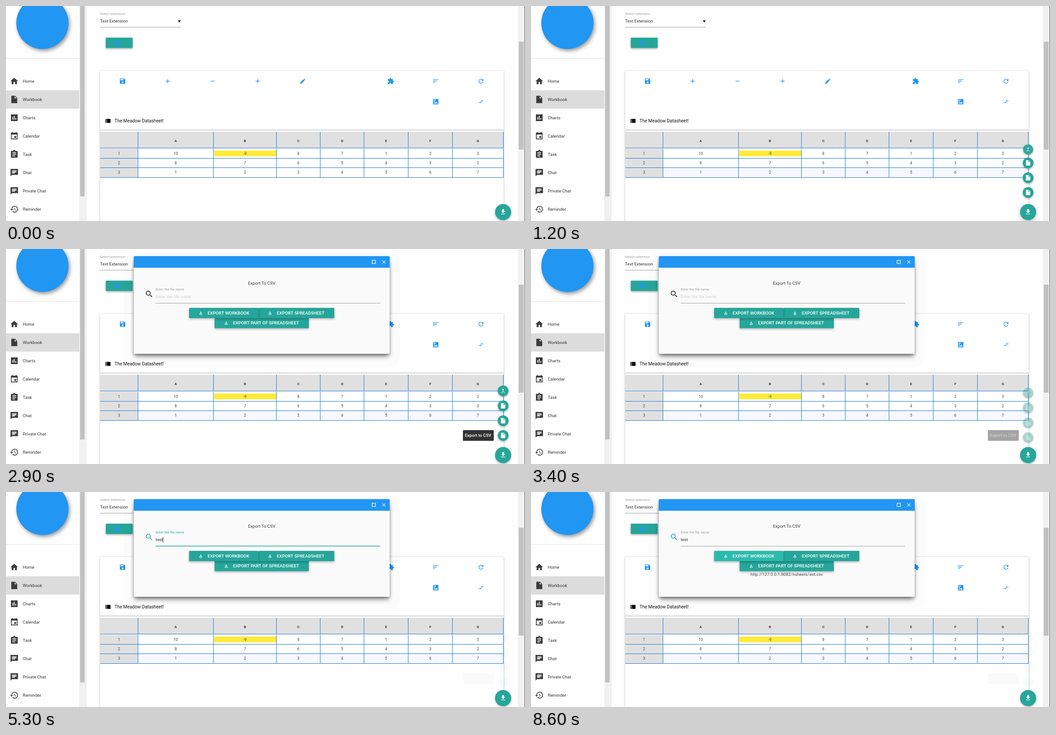
An HTML page with a canvas that plays this animation: 1162x482 px, repeating every 9900 ms.

```html
<!DOCTYPE html>
<html lang="en">
<head>
<meta charset="utf-8">
<title>Worksheet export</title>
<style>
  html, body { margin: 0; width: 100%; height: 100%; overflow: hidden; background: #fff; }
  canvas { display: block; }
</style>
</head>
<body>
<canvas id="stage" width="1162" height="482"></canvas>
<script>
const ctx = document.getElementById('stage').getContext('2d');
const LOOP = 9900, STEP = 100;
const TEAL = '#26a69a', BLUE = '#2196f3', LINE = '#1976d2';

// Icon outlines on a 24 unit square, filled even-odd
const ICONS = {
  home: 'M10 20v-6h4v6h5v-8h3L12 3 2 12h3v8z',
  file: 'M4 2H14l6 6V22H4zM13 3.5V9h5.5z',
  chart: 'M3 3H21V21H3zM7 10h2v7H7zM11 7h2v10h-2zM15 13h2v4h-2z',
  event: 'M3 3h3V1h2v2h8V1h2v2h3v18H3zM5 8v11h14V8zM12 12h5v5h-5z',
  task: 'M3 3h6a3 3 0 0 1 6 0h6v18H3zM11 4a1 1 0 1 0 2 0 1 1 0 1 0-2 0zM7 7h10v2H7zM7 11h10v2H7zM7 15h7v2H7z',
  chat: 'M2 2H22V18H6l-4 4zM6 6h12v2H6zM6 9h12v2H6zM6 12h8v2H6z',
  history: 'M4 12a9 9 0 1 1 2.64 6.36l1.42-1.42A7 7 0 1 0 6 12h3l-4 4-4-4zM12 8h1.5v4.25l3.5 2.08-.72 1.21L12 13z',
  save: 'M3 3H17l4 4V21H3zM5 5v4h10V5zM9 16a3 3 0 1 0 6 0 3 3 0 1 0-6 0z',
  add: 'M19 13h-6v6h-2v-6H5v-2h6V5h2v6h6z',
  remove: 'M5 11h14v2H5z',
  edit: 'M3 17.25V21h3.75L17.8 9.9l-3.75-3.75zM20.7 7 17 3.3l-1.9 1.8 3.75 3.75z',
  puzzle: 'M2 5h6V3.5a2.5 2.5 0 0 1 5 0V5h6v6h1.5a2.5 2.5 0 0 1 0 5H19v6h-5.8v-1.5a2.7 2.7 0 0 0-5.4 0V22H2v-5.8h1.5a2.7 2.7 0 0 0 0-5.4H2z',
  sort: 'M3 16h6v2H3zM3 6h18v2H3zM3 11h12v2H3z',
  refresh: 'M17.65 6.35A8 8 0 1 0 19.73 14h-2.08a6 6 0 1 1-1.43-6.22L13 11h7V4z',
  picture: 'M3 3H21V21H3zM5 5v3a3 3 0 0 0 3-3zM5 10v2a7 7 0 0 0 7-7h-2a5 5 0 0 1-5 5zM5 18h14l-4.5-6-3.5 4.5-2.5-3z',
  compare: 'M2 14h7v-3l4 4-4 4v-3H2zM22 8h-7V5l-4 4 4 4v-3h7z',
  download: 'M19 9h-4V3H9v6H5l7 7zM5 18h14v2H5z',
  merge: 'M17 20.4 18.4 19 15 15.6 13.6 17zM7.5 8H11v5.6L5.6 19 7 20.4l6-6V8h3.5L12 3.5z',
  search: 'M3 9.5a6.5 6.5 0 1 1 11.4 4.2l.3.3h.8l5 5-1.5 1.5-5-5v-.8l-.3-.3A6.5 6.5 0 0 1 3 9.5zM5 9.5a4.5 4.5 0 1 0 9 0 4.5 4.5 0 1 0-9 0z',
  close: 'M19 6.4 17.6 5 12 10.6 6.4 5 5 6.4 10.6 12 5 17.6 6.4 19 12 13.4 17.6 19 19 17.6 13.4 12z',
  square: 'M4 4H20V20H4zM6.5 6.5v11h11v-11z',
  work: 'M11 5h2v5.6h3.5L12 15.1l-4.5-4.5H11zM6 14h2a4 4 0 0 0 8 0h2a6 6 0 0 1-12 0z'
};
for (const name in ICONS) ICONS[name] = new Path2D(ICONS[name]);

const clamp = v => Math.max(0, Math.min(1, v));
const span = (t, from, to) => clamp((t - from) / (to - from));
const ease = p => p < .5 ? 2 * p * p : 1 - 2 * (1 - p) ** 2;
const mix = (a, b, p) => `rgb(${a.map((v, i) => Math.round(v + (b[i] - v) * p))})`;
const teal = [38, 166, 154], grey = [158, 158, 158], dark = [33, 33, 33];

function rect(x, y, w, h, color) {
  ctx.fillStyle = color;
  ctx.fillRect(x, y, w, h);
}

function icon(name, x, y, size, color) {
  ctx.save();
  ctx.translate(x - size / 2, y - size / 2);
  ctx.scale(size / 24, size / 24);
  ctx.fillStyle = color;
  ctx.fill(ICONS[name], 'evenodd');
  ctx.restore();
}

// y is the middle of the capitals
function text(str, x, y, size, color, align = 'left', weight = 400) {
  ctx.font = `${weight} ${size}px Roboto, sans-serif`;
  ctx.textAlign = align;
  ctx.fillStyle = color;
  ctx.fillText(str, x, y + size * .355);
}

function shadow(alpha, blur, dy, dx = 0) {
  ctx.shadowColor = `rgba(0,0,0,${alpha})`;
  ctx.shadowBlur = blur;
  ctx.shadowOffsetX = dx;
  ctx.shadowOffsetY = dy;
}

function panel(x, y, w, h, r, color, ...cast) {
  ctx.save();
  if (cast.length) shadow(...cast);
  ctx.fillStyle = color;
  ctx.beginPath();
  ctx.roundRect(x, y, w, h, r);
  ctx.fill();
  ctx.restore();
}

function disc(x, y, r, color, ...cast) {
  ctx.save();
  if (cast.length) shadow(...cast);
  ctx.fillStyle = color;
  ctx.beginPath();
  ctx.arc(x, y, r, 0, 7);
  ctx.fill();
  ctx.restore();
}

function sidebar() {
  disc(81.5, 38, 58.5, BLUE, .4, 9, 4, 3);
  rect(0, 117, 164, 1, '#e6e6e6');
  rect(0, 189, 164, 41, '#dcdcdc');
  const items = [['home', 'Home'], ['file', 'Workbook'], ['chart', 'Charts'], ['event', 'Calendar'],
    ['task', 'Task'], ['chat', 'Chat'], ['chat', 'Private Chat'], ['history', 'Reminder']];
  items.forEach(([name, label], i) => {
    const y = 168.5 + 41 * i;
    icon(name, 18.5, y, 20, '#3c3c3c');
    text(label, 37.5, y + .5, 9.65, '#333');
  });
  rect(164, 0, 14, 482, '#f1f1f1');
  rect(166, 0, 10, 427, '#c1c1c1');
  rect(178, 0, 2, 482, '#ebebef');
}

function pageTop() {
  text('Select extension', 210.5, 17, 7.75, '#9e9e9e');
  text('Text Extension', 210.5, 34, 9.65, '#333');
  rect(210, 47, 181, 1, '#9e9e9e');
  ctx.fillStyle = '#000';
  ctx.fill(new Path2D('M385 32h6l-3 5.5z'));
  panel(223.5, 71, 60, 23, 1.5, TEAL, .35, 4, 2);
  icon('save', 249, 82.5, 14, BLUE);
}

function table(hover) {
  const cols = [211, 296, 465, 606, 704, 802, 901, 1000, 1114];
  const rows = [[10, -9, 8, 7, 1, 2, 3], [8, 7, 6, 5, 4, 3, 2], [1, 2, 3, 4, 5, 6, 7]];
  const mid = i => (cols[i] + cols[i + 1]) / 2 - .5;
  rect(211, 282, 903, 36, '#e0e0e0');
  rect(211, 320, 84, 64, '#e0e0e0');
  ctx.globalAlpha = hover;
  rect(296, 363, 817, 21, '#f6f8fe');
  ctx.globalAlpha = 1;
  rect(466, 324, 139, 13, '#ffeb3b');
  for (const y of [318, 341, 362, 384]) rect(211, y, 903, 1, LINE);
  for (const x of cols.slice(1)) {
    rect(x - 1, 282, 1, 37, LINE);
    rect(x - 1, 320, 1, 64, LINE);
  }
  [...'ABCDEFG'].forEach((c, i) => text(c, mid(i + 1), 302.5, 8, '#333', 'center', 700));
  rows.forEach((row, r) => {
    const y = 330.5 + 21.4 * r;
    text(r + 1, mid(0), y, 8.8, '#444', 'center');
    row.forEach((v, i) => text(v, mid(i + 1), y, 8.8, '#444', 'center'));
  });
}

function sheet(hover) {
  panel(211, 145.5, 903, 360, 1.5, '#fff', .3, 4, 1);
  const tools = [['save', 261], ['add', 362], ['remove', 462.5], ['add', 563.5], ['edit', 664.5],
    ['puzzle', 861.5], ['sort', 962], ['refresh', 1063.5]];
  for (const [name, x] of tools) icon(name, x, 168.5, 16, BLUE);
  icon('picture', 962, 214.5, 16, BLUE);
  icon('compare', 1063.5, 214.5, 14, BLUE);
  rect(223, 253, 2, 9, '#000');
  rect(226, 253, 8, 9, '#000');
  text('The Meadow Datasheet!', 243, 257.5, 10.2, '#111');
  rect(211, 277, 903, 2, '#d2d0d0');
  table(hover);
}

function menu(t) {
  const out = span(t, 2950, 3600);
  for (let i = 0; i < 4; i++) {
    const start = 960 + 30 * i;
    const p = ease(span(t, start, start + 190));
    if (!p) continue;
    const y = [418, 385, 351.5, 318][i] + 40 * (1 - p) + 7 * out;
    const s = .4 + .6 * p;
    ctx.globalAlpha = p * (1 - .975 * out);
    disc(1113, y, 12 * s, TEAL, .3, 4, 2);
    icon(i < 3 ? 'file' : 'merge', 1113, y, 14.5 * s, '#fff');
  }
  const tip = span(t, 2150, 2300) * (1 - .975 * span(t, 3000, 3700));
  if (tip) {
    ctx.globalAlpha = tip;
    panel(1023, 406, 69, 24, 1.5, '#323232');
    text('Export to CSV', 1057, 418, 9.5, '#fff', 'center', 500);
  }
  ctx.globalAlpha = 1;
  const lift = span(t, 850, 1000) * (1 - span(t, 1650, 1800));
  disc(1113, 462, 18, TEAL, .3, 5 + 4 * lift, 2 + lift);
  icon('download', 1113, 461.5, 16, '#fff');
}

function button(x, y, w, label, color, ripple) {
  panel(x, y, w, 23, 1.5, color, .3, 5, 2);
  if (ripple) ripple();
  icon('work', x + 26, y + 11.5, 13, '#fff');
  text(label, x + 41.3, y + 11.2, 9.9, '#fff', 'left', 500);
}

function field(t) {
  const on = span(t, 4050, 4350), off = span(t, 6850, 7100);
  const focus = on * (1 - off);
  const tint = mix(grey, teal, focus);
  icon('search', 320.5, 101, 20, mix(dark, teal, on));
  text('Enter the file name', 335, 90.5, 7.7, tint);
  rect(335, 121, 503, 1, tint);
  if (t < 6900) {
    ctx.globalAlpha = on;
    rect(335, 120.5, 503, 1.5, TEAL);
    ctx.globalAlpha = 1;
  }

  const count = [4900, 5000, 5200, 5300].filter(at => t >= at).length;
  const typed = 'test'.slice(0, count);
  if (count) text(typed, 335, 107, 9.65, '#333');
  else text('Enter the file name', 335, 107, 9.6, '#d0d0d0');
  const blink = [[4100, 4600], [4900, 5800], [6300, 6700]];
  if (blink.some(([a, b]) => t >= a && t < b)) {
    ctx.font = '400 9.65px Roboto, sans-serif';
    rect(335 + Math.round(ctx.measureText(typed).width), 101, 1, 12, '#222');
  }
}

function dialog(t) {
  panel(264, 8, 618, 258, 26, 'rgba(0,0,0,.012)');
  panel(288, 24, 569, 211, 2, '#888', .5, 11, 5);
  panel(286, 16, 573, 219, 2, '#fafafa', .25, 5, 2);
  panel(286, 16, 573, 26, [2, 2, 0, 0], BLUE);
  icon('square', 823.5, 29, 13, '#fff');
  icon('close', 846, 29, 13, '#fff');
  text('Export To CSV', 572.5, 76.5, 9.6, '#333', 'center');
  field(t);

  if (t >= 7100) text('http://127.0.0.1:8082/nsheets/est.csv', 572.5, 185, 9.6, '#444', 'center');
  button(467, 154.5, 211, 'EXPORT PART OF SPREADSHEET', TEAL);
  button(565, 132, 170, 'EXPORT SPREADSHEET', TEAL);
  button(410, 132, 155, 'EXPORT WORKBOOK', mix(teal, [43, 187, 173], span(t, 6150, 6300)), () => {
    if (t < 6900 || t >= 7400) return;
    const p = span(t, 6900, 7400);
    ctx.save();
    ctx.beginPath();
    ctx.rect(410, 132, 155, 23);
    ctx.clip();
    disc(470, 143, 25 + 110 * p, `rgba(255,255,255,${.13 * (1 - p)})`);
    ctx.restore();
  });
}

function draw(t) {
  ctx.globalAlpha = 1;
  rect(0, 0, 1162, 482, '#fefefe');
  sidebar();
  pageTop();
  sheet(span(t, 550, 700));
  rect(1146, 0, 15, 482, '#f1f1f1');
  rect(1148, 80, 11, 242, '#c1c1c1');
  rect(1161, 0, 1, 482, '#444');
  menu(t);
  if (t >= 2900) dialog(t);
}

function frame() {
  const t = performance.now() % LOOP;
  draw(Math.floor(t / STEP) * STEP);
  requestAnimationFrame(frame);
}
frame();
</script>
</body>
</html>
```
